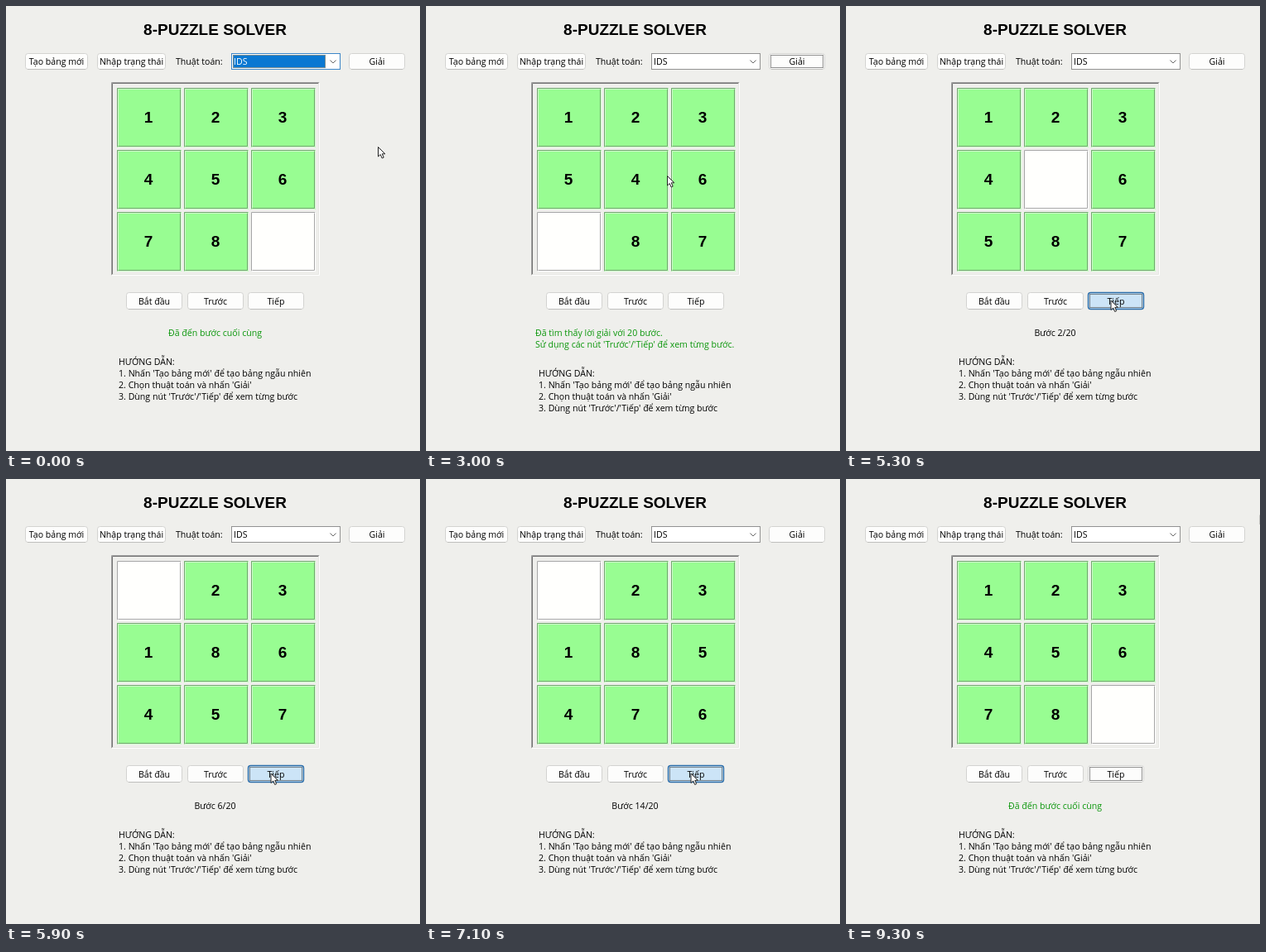
An HTML page that plays this animation: 500x538 px, repeating every 9500 ms.

```html
<!DOCTYPE html>
<html lang="vi">
<head>
<meta charset="utf-8">
<title>8-Puzzle Solver</title>
<style>
  html, body { margin: 0; width: 100%; height: 100%; overflow: hidden; background: #efefec; }
  svg { display: block; width: 500px; height: 538px; }
  text { font: 10.6px "Open Sans", "Noto Sans", sans-serif; fill: #000; white-space: pre; }
  .mid { text-anchor: middle; }
  .big { font: bold 19px "Liberation Sans", Arial, sans-serif; text-anchor: middle; }
  .face { fill: #fdfdfc; stroke: #d3d3d1; }
  .edge { stroke: #bfbfbd; }
  .focus { fill: none; stroke: #222; stroke-dasharray: 1 1; visibility: hidden; }
  .on .focus { visibility: visible; }
  .hot .face { fill: #cce4f7; stroke: #2b6ca8; stroke-width: 1.4; }
  .hot .edge { stroke: none; }
  .box { fill: #fff; stroke: #929292; }
  .sel { fill: none; }
  .combo.on .box { stroke: #3c86c8; }
  .combo.on .sel { fill: #0a78d2; }
  .combo.on text { fill: #fff; }
  .combo.on .focus { stroke: #e0a050; }
  .arrow { fill: none; stroke: #666; }
</style>
</head>
<body>
<script>
const NS = 'http://www.w3.org/2000/svg';
const LOOP = 9500, TICK = 100;

function add(parent, tag, attrs = {}, text) {
  const el = document.createElementNS(NS, tag);
  for (const k in attrs) el.setAttribute(k, attrs[k]);
  if (text !== undefined) el.textContent = text;
  return parent.appendChild(el);
}
const rect = (p, x, y, width, height, attrs) => add(p, 'rect', { x, y, width, height, ...attrs });
const label = (p, x, y, text, cls = '') => add(p, 'text', { x, y, class: cls }, text);
const line = (p, d, stroke) => add(p, 'path', { d, stroke, fill: 'none' });

const svg = add(document.body, 'svg', { viewBox: '0 0 500 538' });

// Two-tone bevel: upper-left and lower-right edges of a box
function bevel(p, x, y, w, h, upper, lower) {
  const r = x + w - .5, b = y + h - .5, l = x + .5, t = y + .5;
  line(p, `M${l} ${b}V${t}H${r}`, upper);
  line(p, `M${r} ${t}V${b}H${l}`, lower);
}

function button(x, y, w, h, text) {
  const g = add(svg, 'g');
  rect(g, x + .5, y + .5, w - 1, h - 1, { rx: 3, class: 'face' });
  add(g, 'path', { d: `M${x + 3} ${y + h - .5}h${w - 6}`, class: 'edge' });
  rect(g, x + 2.5, y + 2.5, w - 5, h - 5, { class: 'focus' });
  label(g, x + w / 2, y + h / 2 + 4, text, 'mid');
  return { g, hit: (px, py) => px > x && px < x + w && py > y && py < y + h };
}

label(svg, 252.5, 35, '8-PUZZLE SOLVER', 'big');

const buttons = {
  create: button(23, 57, 76, 20, 'Tạo bảng mới'),
  input: button(110, 57, 83, 20, 'Nhập trạng thái'),
  solve: button(414, 57, 68, 20, 'Giải'),
  first: button(145, 346, 68, 21, 'Bắt đầu'),
  prev: button(219, 346, 68, 21, 'Trước'),
  next: button(292, 346, 68, 21, 'Tiếp')
};

label(svg, 205, 71, 'Thuật toán:');
const combo = add(svg, 'g', { class: 'combo' });
rect(combo, 272.5, 57.5, 131, 19, { class: 'box' });
rect(combo, 274, 59, 112, 16, { class: 'sel' });
rect(combo, 274.5, 59.5, 111, 15, { class: 'focus' });
label(combo, 275, 71, 'IDS');
add(combo, 'path', { d: 'M391.5 65.5l3.5 3.5l3.5-3.5', class: 'arrow' });

bevel(svg, 127, 92, 252, 234, '#a0a0a0', '#ffffff');
bevel(svg, 128, 93, 250, 232, '#747474', '#e6e6e3');

// A cell is a groove-edged box with a numeral; zero is the gap
const cells = Array.from({ length: 9 }, (_, i) => {
  const x = 134 + 81 * (i % 3), y = 99 + 75 * (i / 3 | 0);
  const make = (fill, dark, light) => {
    const g = add(svg, 'g');
    rect(g, x, y, 78, 72, { fill });
    bevel(g, x, y, 78, 72, dark, light);
    bevel(g, x + 1, y + 1, 76, 70, light, dark);
    return g;
  };
  const gap = make('#fffffd', '#a6a6a6', '#ffffff');
  const tile = make('#98fd92', '#73a670', '#d0fccd');
  const num = label(tile, x + 38, y + 42, '', 'big');
  return n => {
    gap.style.display = n ? 'none' : '';
    tile.style.display = n ? '' : 'none';
    num.textContent = n;
  };
});

const status = [399, 413].map(y => label(svg, 252.5, y, ''));
const help = add(svg, 'g');
['HƯỚNG DẪN:',
 "1. Nhấn 'Tạo bảng mới' để tạo bảng ngẫu nhiên",
 "2. Chọn thuật toán và nhấn 'Giải'",
 "3. Dùng nút 'Trước'/'Tiếp' để xem từng bước"
].forEach((s, i) => label(help, 136, 434 + 14 * i, s));

const cursor = add(svg, 'path', {
  d: 'M.5 .5V12L3.2 9.5L5.2 14L7.2 13.1L5.3 8.8H8.8Z',
  fill: '#fff', stroke: '#222', 'stroke-linejoin': 'round'
});

// Puzzle states, following the gap along the solution
const MOVES = 'URDLUUDRDRULLUDDRURD';
const SHIFT = { U: -3, D: 3, L: -1, R: 1 };
const GOAL = [1, 2, 3, 4, 5, 6, 7, 8, 0];
const states = [[1, 2, 3, 5, 4, 6, 0, 8, 7]];
for (const m of MOVES) {
  const s = states[states.length - 1].slice();
  const a = s.indexOf(0), b = a + SHIFT[m];
  [s[a], s[b]] = [s[b], s[a]];
  states.push(s);
}

const CREATE = 1400, SOLVE = 1900, NEXT = 5150, GAP = 150;

// Pointer route: time, x, y
const route = [
  [0, 449, 170], [500, 370, 150], [1000, 251, 148], [1400, 66, 67], [1500, 66, 67],
  [1900, 444, 66], [2100, 444, 66], [3000, 291, 205], [3200, 325, 240],
  [3450, 255, 314], [3700, 172, 230], [4000, 220, 138], [4500, 249, 144],
  [4900, 319.5, 355.5], [8200, 319.5, 355.5], [8600, 378, 262], [8900, 378, 262],
  [9300, 499.8, 43], [LOOP, 499.8, 43]
];
function pointer(t) {
  const i = Math.max(1, route.findIndex(p => p[0] >= t));
  const [t0, x0, y0] = route[i - 1], [t1, x1, y1] = route[i];
  const k = (t - t0) / (t1 - t0);
  return [x0 + (x1 - x0) * k, y0 + (y1 - y0) * k];
}

function message(t, clicks) {
  if (t < CREATE || clicks > MOVES.length) return ['Đã đến bước cuối cùng'];
  if (t < SOLVE) return [''];
  if (clicks) return [`Bước ${clicks}/${MOVES.length}`];
  return [`Đã tìm thấy lời giải với ${MOVES.length} bước.`,
          "Sử dụng các nút 'Trước'/'Tiếp' để xem từng bước."];
}

function draw(t) {
  const clicks = t < NEXT ? 0 : Math.floor((t - NEXT) / GAP) + 1;
  const board = t < CREATE ? GOAL : states[Math.min(clicks, MOVES.length)];
  board.forEach((n, i) => cells[i](n));

  const msg = message(t, clicks), two = msg.length > 1;
  const plain = clicks > 0 && clicks <= MOVES.length;
  status.forEach((el, i) => {
    el.textContent = msg[i] || '';
    el.setAttribute('x', two ? 132 : 252.5);
    el.style.textAnchor = two ? 'start' : 'middle';
    el.style.fill = plain ? '#000' : '#0a960a';
  });
  help.setAttribute('transform', `translate(0 ${two ? 14 : 0})`);

  const [x, y] = pointer(t);
  cursor.setAttribute('transform', `translate(${x} ${y})`);
  const focus = t < CREATE ? 'combo' : t < SOLVE ? 'create' : t < NEXT ? 'solve' : 'next';
  combo.classList.toggle('on', focus === 'combo');
  for (const name in buttons) {
    const { g, hit } = buttons[name];
    g.classList.toggle('on', name === focus);
    g.classList.toggle('hot', hit(x, y));
  }
}

// The screen refreshes ten times a second
const start = performance.now();
let last = -1;
function loop() {
  const t = Math.floor(((performance.now() - start) % LOOP) / TICK) * TICK;
  if (t !== last) draw(last = t);
  requestAnimationFrame(loop);
}
loop();
</script>
</body>
</html>
```
